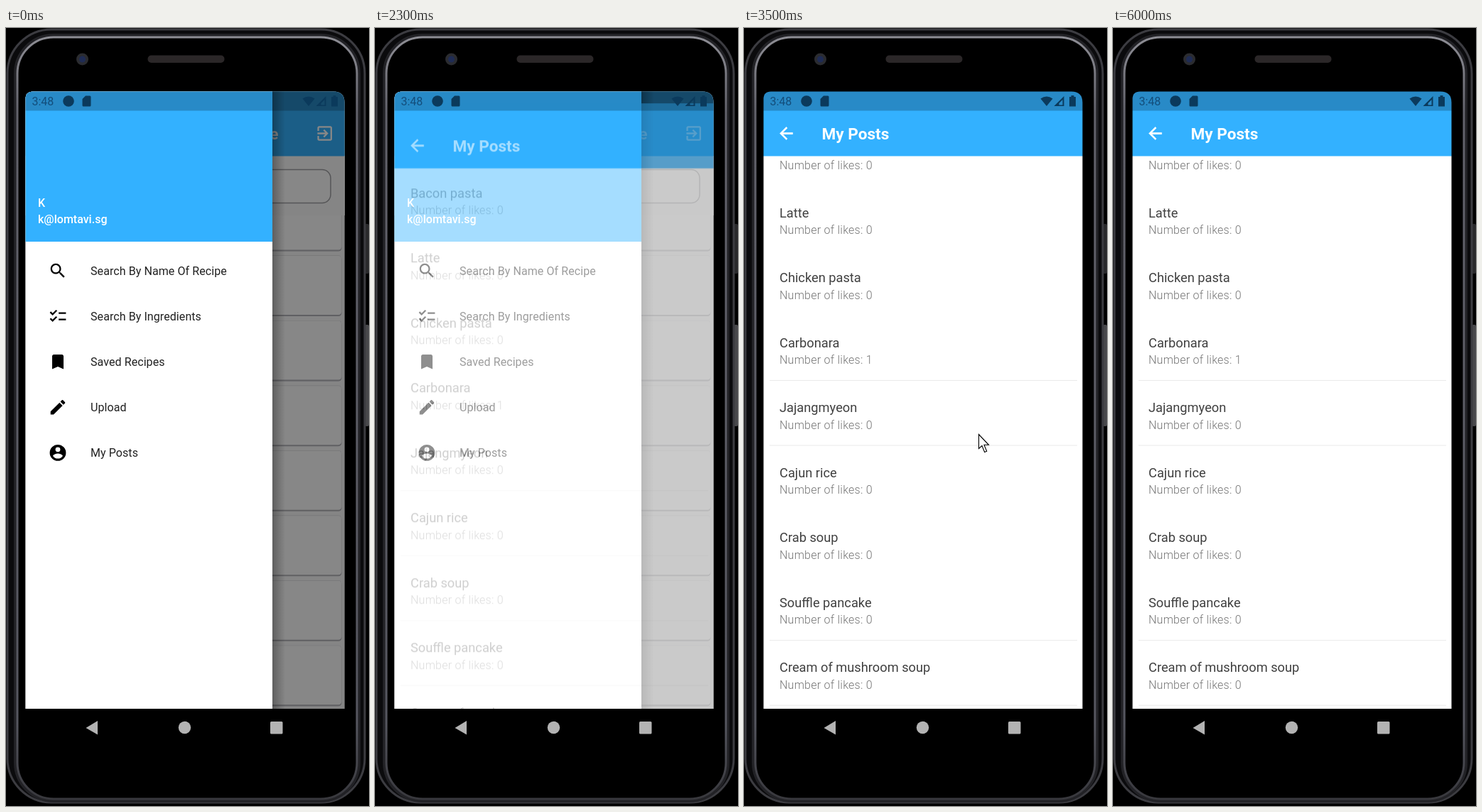
These frames come from a looping animation (511x1096 px, 6.9 s). An HTML page:

```html
<!DOCTYPE html>
<html lang="en">
<head>
<meta charset="utf-8">
<title>Recipe app: my posts</title>
<style>
  html, body { margin: 0; width: 100%; height: 100%; overflow: hidden; background: #000; }
  svg { display: block; width: 100%; height: 100%; font-family: Roboto, sans-serif; }
  .title { font-size: 22.6px; font-weight: 700; fill: #fff; }
  .user { font-size: 16px; font-weight: 500; fill: #fff; }
  .menu { font-size: 16px; fill: #212121; letter-spacing: .08px; }
  .dish { font-size: 18.26px; fill: #404040; }
  .likes { font-size: 16px; font-weight: 300; fill: #757575; letter-spacing: .25px; }
</style>
</head>
<body>
<svg viewBox="0 0 511 1096">
  <defs>
    <clipPath id="screen"><path d="M27.500 959V100q0-10.500 10.500-10.500H461q15.500 0 15.500 15.500V959z"/></clipPath>
    <linearGradient id="edge"><stop stop-opacity=".3"/><stop offset="1" stop-opacity="0"/></linearGradient>
    <linearGradient id="rim" x2="0" y2="1">
      <stop stop-color="#8d8d94"/><stop offset=".1" stop-color="#62626b"/>
      <stop offset=".9" stop-color="#55565f"/><stop offset="1" stop-color="#38383d"/>
    </linearGradient>
  </defs>

  <!-- phone body -->
  <rect width="511" height="1096"/>
  <rect x="505" y="276" width="6" height="70" rx="2" fill="#29292b"/>
  <rect x="505" y="418" width="6" height="143" rx="2" fill="#48484b"/>
  <rect x="2" y="2" width="503" height="1089" rx="62" fill="#0b0b0d" stroke="#3c3c41" stroke-width="3"/>
  <rect x="15" y="12" width="480" height="1075" rx="52" stroke="#222226" stroke-width="8"/>
  <rect x="16" y="13" width="478" height="1073" rx="51" stroke="url(#rim)" stroke-width="3"/>
  <circle cx="107.500" cy="44" r="8.500" fill="#2b2c30"/>
  <circle cx="107.500" cy="44" r="4.500" fill="#1f2c55"/>
  <rect x="199.500" y="38.500" width="108" height="10.500" rx="5" fill="#2b2728"/>
  <g fill="#b3b3b3">
    <path d="M112.500 986l16.500-10v19.500z"/>
    <circle cx="251.500" cy="985.500" r="8.700"/>
    <rect x="372" y="977" width="17.500" height="17.500" rx="1.500"/>
  </g>

  <g clip-path="url(#screen)">
    <!-- home, dimmed -->
    <path d="M27 89H477V959H27z" fill="#fafafa"/>
    <g id="cards"></g>
    <path d="M27 180H477V264H27z" fill="#fafafa"/>
    <rect x="48" y="199.500" width="409" height="47" rx="12" fill="#fff" stroke="#a0a0a4" stroke-width="1.500"/>
    <path d="M27 89H477V180.500H27z" fill="#33b1ff"/>
    <text class="title" x="383.500" y="157" text-anchor="end">Home</text>
    <g id="exit" fill="#fff"></g>
    <path d="M27 89H477V959H27z" opacity=".47"/>
    <rect x="375" y="89" width="18" height="870" fill="url(#edge)"/>

    <!-- drawer -->
    <path d="M27 89H375V959H27z" fill="#fff"/>
    <path d="M27 89H375V301H27z" fill="#33b1ff"/>
    <text class="user" x="45" y="252">K</text>
    <text class="user" x="45" y="275">k@lomtavi.sg</text>
    <g id="menu"></g>

    <!-- posts -->
    <g id="page">
      <path d="M27 89H477V959H27z" fill="#fff"/>
      <g id="list"></g>
      <path d="M27 89H477V180.500H27z" fill="#33b1ff"/>
      <g id="back" fill="#fff" stroke="#fff" stroke-width=".4"></g>
      <text class="title" x="109.500" y="157">My Posts</text>
      <g id="glow">
        <path d="M32 954H467q5 0 5-5V905" fill="none" stroke="#c3e2f3" stroke-width="1.500"/>
      </g>
      <ellipse id="tint" cx="300" cy="985" rx="300" ry="95" fill="#33b1ff" style="mix-blend-mode:screen"/>
      <ellipse id="wash" cx="300" cy="985" rx="300" ry="95" fill="#33b1ff"/>
    </g>

    <!-- status bar -->
    <path d="M27 89H477V116.500H27z" opacity=".22"/>
    <g fill="#0b3a5c">
      <text x="36.500" y="109" font-size="16" fill="#134d7a">3:48</text>
      <circle cx="88" cy="103" r="7.800"/>
      <path d="M107.500 100l4.500-4.500h6q1.500 0 1.500 1.500v12q0 1.500-1.500 1.500h-9q-1.500 0-1.500-1.500z"/>
      <path d="M417.500 99.500q8.500-6 17 0L426 110z"/>
      <path d="M450.500 96v14H436.500zm-2 5l-5 5v2.500h5z" fill-rule="evenodd"/>
      <path d="M458 97h2.500v-2h4v2h2.500v13.500h-9z"/>
    </g>
  </g>
  <path id="cursor" d="M.5 .5V20.500L5 16.500 8.700 25.500l3-1.300L8 15.300H14.500z" fill="#fff" stroke="#000" stroke-width="1.100"/>
</svg>

<script>
const $ = id => document.getElementById(id);
const LOOP = 6900, STEP = 100, ROW = 91.55, SCROLL = 46.5;

// 24-unit icon centred on (x, y)
const icon = (x, y, d) => `<path transform="translate(${x - 13.7} ${y - 13.7}) scale(1.141)" d="${d}"/>`;

const menu = [
  ['Search By Name Of Recipe', 'M15.500 14h-.79l-.28-.27C15.410 12.590 16 11.110 16 9.500 16 5.910 13.090 3 9.500 3S3 5.910 3 9.500 5.910 16 9.500 16c1.610 0 3.090-.59 4.230-1.570l.27.28v.79l5 4.990L20.490 19l-4.990-5zm-6 0C7.010 14 5 11.990 5 9.500S7.010 5 9.500 5 14 7.010 14 9.500 11.990 14 9.500 14z'],
  ['Search By Ingredients', 'M22 7h-9v2h9zM22 15h-9v2h9zM5.540 11L2 7.460l1.410-1.410 2.120 2.120 4.240-4.240 1.410 1.410zM5.540 19L2 15.460l1.410-1.410 2.120 2.120 4.240-4.240 1.410 1.410z'],
  ['Saved Recipes', 'M17 3H7c-1.100 0-2 .9-2 2v16l7-3 7 3V5c0-1.100-.9-2-2-2z'],
  ['Upload', 'M3 17.250V21h3.750L17.810 9.940l-3.750-3.750zM20.710 7.040c.39-.39.39-1.020 0-1.410l-2.340-2.340c-.39-.39-1.020-.39-1.410 0l-1.830 1.830 3.750 3.750z'],
  ['My Posts', 'M12 2a10 10 0 1 0 0 20a10 10 0 1 0 0-20zm0 3a3 3 0 1 1 0 6a3 3 0 1 1 0-6zm0 14.200c-2.500 0-4.710-1.280-6-3.220.03-1.990 4-3.080 6-3.080s5.970 1.090 6 3.080c-1.290 1.940-3.500 3.220-6 3.220z']
];
$('menu').innerHTML = menu.map(([label, d], i) =>
  icon(73, 342 + 64.1 * i, d) + `<text class="menu" x="119" y="${348 + 64.1 * i}">${label}</text>`).join('');

$('exit').innerHTML = icon(448.7, 148.5, 'M10.090 15.590L11.500 17l5-5-5-5-1.410 1.410L12.670 11H3v2h9.670zM19 3H5c-1.110 0-2 .9-2 2v4h2V5h14v14H5v-4H3v4c0 1.100.89 2 2 2h14c1.100 0 2-.9 2-2V5c0-1.100-.9-2-2-2z');
$('back').innerHTML = icon(59.5, 148.5, 'M20 11H7.830l5.590-5.590L12 4l-8 8 8 8 1.410-1.410L7.830 13H20z');

const card = (y, h, fill) => `<rect x="33" y="${y}" width="439.500" height="${h}" rx="4.500" fill="${fill}"/>`;
$('cards').innerHTML = [...Array(8).keys()].map(i => {
  const y = 229.5 + ROW * i;
  return card(y - .7, 85.5, '#dcdce0') + card(y + 1, 84, '#b4b4ba') + card(y, 83, '#fff');
}).join('');

const dishes = ['Bacon pasta', 'Latte', 'Chicken pasta', 'Carbonara', 'Jajangmyeon',
  'Cajun rice', 'Crab soup', 'Souffle pancake', 'Cream of mushroom soup'];
$('list').innerHTML = dishes.map((name, i) => {
  const y = 221.5 + ROW * i;
  return `<text class="dish" x="50" y="${y}">${name}</text>
    <text class="likes" x="50" y="${y + 23.5}">Number of likes: ${i == 3 ? 1 : 0}</text>
    <path class="rule" d="M36 ${y + 46.8}H469" stroke="#e9e9e9"/>`;
}).join('');
const rules = document.querySelectorAll('.rule');

const clamp = v => Math.min(1, Math.max(0, v));
const ramp = (t, a, b) => clamp((t - a) / (b - a));

// cubic-bezier easing, solved by bisection
function bezier(x1, y1, x2, y2) {
  const at = (s, a, b) => 3 * s * (1 - s) ** 2 * a + 3 * s * s * (1 - s) * b + s ** 3;
  return x => {
    let lo = 0, hi = 1;
    for (let i = 0; i < 24; i++) {
      const mid = (lo + hi) / 2;
      if (at(mid, x1, x2) < x) lo = mid; else hi = mid;
    }
    return at(hi, y1, y2);
  };
}
const slide = bezier(.4, 0, .2, 1), fade = bezier(.3, 0, 1, 1);

// pointer paths: [ms, x, y]; the pointer is hidden outside them
const paths = [
  [[1300, 408, 559], [1800, 200, 599], [2300, 200, 599]],
  [[2700, 225, 600], [3100, 332, 650], [3300, 332, 650], [3500, 330, 572], [4100, 334, 433], [4200, 334, 406], [4300, 334, 406]]
];
function pointer(t) {
  for (const path of paths)
    for (let i = 1; i < path.length; i++) {
      const [a, x, y] = path[i - 1], [b, u, v] = path[i];
      if (t >= a && t < b) {
        const k = ramp(t, a, b);
        return [x + (u - x) * k, y + (v - y) * k];
      }
    }
}

function draw(t) {
  const open = ramp(t, 2100, 2400);
  $('page').setAttribute('opacity', fade(open));
  $('page').setAttribute('visibility', open > 0 ? 'visible' : 'hidden');
  $('page').setAttribute('transform', `translate(0 ${217 * (1 - slide(open))})`);

  const scroll = t < 3400 ? 0 : t < 3500 ? 18 : SCROLL;
  $('list').setAttribute('transform', `translate(0 ${-scroll})`);
  $('list').setAttribute('opacity', open * open);
  const shown = scroll < SCROLL ? [4, 5, 6, 7] : [3, 4, 7, 8];
  rules.forEach((r, i) => r.setAttribute('opacity', shown.includes(i) ? 1 : 0));

  const glow = ramp(t, 3500, 3800) * (1 - ramp(t, 4100, 4500));
  $('glow').setAttribute('opacity', glow);
  $('tint').setAttribute('opacity', .4 * glow);
  $('wash').setAttribute('opacity', t < 4100 ? .1 * glow : 0);

  const p = pointer(t);
  $('cursor').setAttribute('visibility', p ? 'visible' : 'hidden');
  if (p) $('cursor').setAttribute('transform', `translate(${p})`);
}

const start = performance.now();
function tick() {
  const t = (performance.now() - start) % LOOP;
  draw(Math.floor(t / STEP) * STEP);
  requestAnimationFrame(tick);
}
tick();
</script>
</body>
</html>
```
